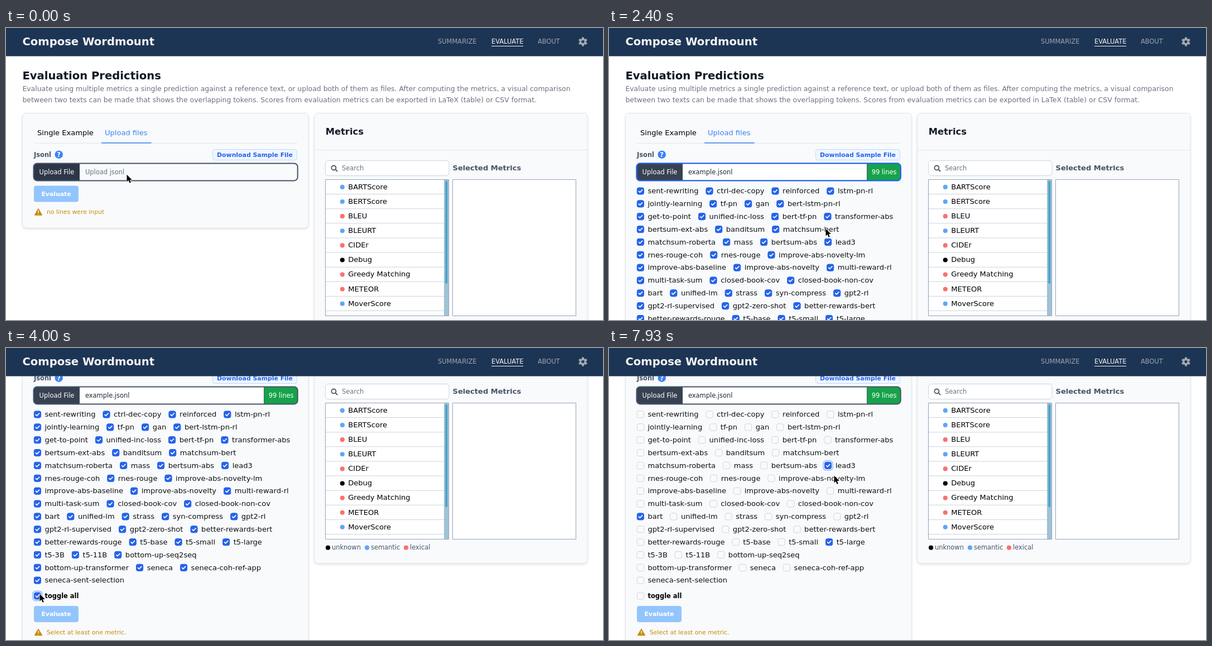
Write an HTML page with a canvas that moves like this. It is 1070 px wide and 523 px high and loops after 8 s.

```html
<!DOCTYPE html>
<html lang="en">
<head>
<meta charset="utf-8">
<title>Evaluation Predictions</title>
<style>
  html, body { margin: 0; width: 100%; height: 100%; overflow: hidden; background: #fff; }
  canvas { display: block; }
</style>
</head>
<body>
<canvas id="stage" width="1070" height="523"></canvas>
<script>
const ctx = document.getElementById('stage').getContext('2d');
const LOOP = 8000, TICKS_PER_MS = 0.015;
const BODY = 13.06, INTRO = 12.43, SMALL = 11.43, BUTTON = 10.88, LARGE = 19.6;
const BLUE = '#2563eb', SKY = '#60a5fa', RED = '#f87171', AMBER = '#ca8a04';
const SLATE = '#475569', GRAY = '#6b7280', LINE = '#e2e8f0';

const models = `sent-rewriting ctrl-dec-copy reinforced lstm-pn-rl
jointly-learning tf-pn gan bert-lstm-pn-rl
get-to-point unified-inc-loss bert-tf-pn transformer-abs
bertsum-ext-abs banditsum matchsum-bert
matchsum-roberta mass bertsum-abs lead3
rnes-rouge-coh rnes-rouge improve-abs-novelty-lm
improve-abs-baseline improve-abs-novelty multi-reward-rl
multi-task-sum closed-book-cov closed-book-non-cov
bart unified-lm strass syn-compress gpt2-rl
gpt2-rl-supervised gpt2-zero-shot better-rewards-bert
better-rewards-rouge t5-base t5-small t5-large
t5-3B t5-11B bottom-up-seq2seq
bottom-up-transformer seneca seneca-coh-ref-app
seneca-sent-selection`.split('\n').map(row => row.split(' '));

const metrics = [['BARTScore', SKY], ['BERTScore', SKY], ['BLEU', RED], ['BLEURT', SKY], ['CIDEr', RED],
  ['Debug', '#000'], ['Greedy Matching', RED], ['METEOR', RED], ['MoverScore', SKY], ['ROUGE', RED]];

// Pointer moves: first tick, last tick, x, y
const moves = [[2, 2, 215.5, 261.5], [5, 8, 211, 258], [12, 22, 388, 359], [41, 41, 389, 361],
  [43, 49, 262, 334], [52, 53, 57, 472], [55, 56, 60, 440], [64, 65, 84, 426], [67, 68, 254, 399],
  [70, 72, 280, 357], [76, 81, 397, 343], [91, 91, 46, 313], [92, 93, 39, 308], [94, 97, 56, 302],
  [102, 108, 406, 214], [119, 119, 403, 228]];

// Scroll position from a given tick on
const scrolls = [[0, 0], [43, 18], [44, 95], [46, 120], [49, 161.5], [52, 168], [53, 173]];

function text(str, x, y, size, color, bold, align = 'left') {
  ctx.font = `${bold ? 'bold ' : ''}${size}px "DejaVu Sans", sans-serif`;
  ctx.fillStyle = color;
  ctx.textAlign = align;
  ctx.fillText(str, x, y + size * 0.325);
}

function box(x, y, w, h, r, fill, stroke, width = 1) {
  ctx.beginPath();
  ctx.roundRect(x, y, w, h, r);
  if (fill) { ctx.fillStyle = fill; ctx.fill(); }
  if (stroke) { ctx.strokeStyle = stroke; ctx.lineWidth = width; ctx.stroke(); }
}

function dot(x, y, r, color) {
  ctx.beginPath();
  ctx.arc(x, y, r, 0, 7);
  ctx.fillStyle = color;
  ctx.fill();
}

function path(d, x, y, stroke, width, fill) {
  const shape = new Path2D(d);
  ctx.save();
  ctx.translate(x, y);
  if (fill) { ctx.fillStyle = fill; ctx.fill(shape); }
  if (stroke) {
    ctx.strokeStyle = stroke;
    ctx.lineWidth = width;
    ctx.lineCap = ctx.lineJoin = 'round';
    ctx.stroke(shape);
  }
  ctx.restore();
}

function card(x, y, w, h) {
  ctx.save();
  ctx.shadowColor = 'rgba(0,0,0,.13)';
  ctx.shadowBlur = 5;
  ctx.shadowOffsetY = 2;
  box(x, y, w, h, 6.5, '#f8fafc');
  ctx.restore();
  box(x, y, w, h, 6.5, null, LINE);
}

function checkbox(x, y, checked, focused) {
  if (focused) box(x - 2, y - 8.5, 17, 17, 5, '#fff', '#7fb0fb', 1.3);
  box(x + .4, y - 6.1, 12.2, 12.2, 3, checked ? BLUE : '#f9fafb', checked ? BLUE : '#d1d5db');
  if (checked) path('M-3 .3L-1 2.3L3.2-2', x + 6.5, y, '#fff', 1.7);
}

function mixBlue(p) {
  const mix = (a, b) => Math.round(a + (b - a) * p);
  return `rgb(${mix(147, 37)},${mix(197, 99)},${mix(253, 235)})`;
}

function drawField(loaded, focused) {
  text('Jsonl', 50, 227, SMALL, SLATE, true);
  dot(94.7, 226.7, 7.2, '#3b82f6');
  text('?', 94.7, 226.9, 11.5, '#fff', true, 'center');
  box(370.5, 217.5, 151, 19, 4, '#eff6ff', '#bfdbfe');
  text('Download Sample File', 446, 227, BUTTON, BLUE, true, 'center');

  ctx.save();
  ctx.beginPath();
  ctx.roundRect(49.5, 242.4, 473.2, 31, 6);
  ctx.clip();
  box(49, 242, 474, 32, 0, loaded ? '#fff' : '#f8fafc');
  box(49, 242, 83, 32, 0, loaded ? '#374151' : '#2d3748');
  if (loaded) box(463, 242, 60, 32, 0, '#16a34a');
  ctx.restore();
  if (loaded) {
    box(462, 243, 1, 30, 0, SLATE);
    text('99 lines', 493, 258, SMALL, '#fff', false, 'center');
  }
  box(49.5, 242.4, 473.2, 31, 6.3, null, focused ? BLUE : SLATE, focused ? 2.4 : 2);
  text('Upload File', 91, 258, SMALL, '#fff', false, 'center');
  text(loaded ? 'example.jsonl' : 'Upload jsonl', 142, 258, SMALL, loaded ? '#1f2937' : GRAY);
}

function drawModels(tick) {
  const all = tick < 62;
  const checkedFrom = { 't5-large': 88, bart: 104, lead3: 116 };
  const focusTicks = { 't5-large': [85, 102], bart: [102, 113], lead3: [116, 999] };
  models.forEach((row, i) => {
    let x = 49.9;
    const y = 292 + i * 22.86;
    for (const name of row) {
      const [from, to] = focusTicks[name] || [0, 0];
      checkbox(x, y, all || tick >= checkedFrom[name], tick >= from && tick < to);
      text(name, x + 19.6, y, BODY, '#111');
      x += 32.65 + ctx.measureText(name).width;
    }
  });
  checkbox(49.9, 617, all, tick >= 58 && tick < 85);
  text('toggle all', 69.5, 617, SMALL, '#000', true);
}

function drawLeft(tick) {
  const loaded = tick >= 36;
  const ready = tick >= 62 && tick < 88;
  const buttonY = loaded ? 649.5 : 297;
  card(29.5, 152.5, 512.5, buttonY + (ready ? 34.5 : 61) - 152.5);

  text('Single Example', 56, 188, BODY, '#000');
  text('Upload files', 177, 188, BODY, '#3b82f6');
  box(50, 206, 472, 1, 0, LINE);
  box(171, 205, 89.5, 1.6, 0, '#3b82f6');
  drawField(loaded, (tick >= 5 && tick < 10) || (loaded && tick < 58));
  if (loaded) drawModels(tick);

  box(50, buttonY - 14.5, 80, 29, 4, mixBlue(ready ? Math.min(1, (tick - 61) / 4) : 0));
  text('Evaluate', 90, buttonY, BUTTON, '#fff', true, 'center');
  if (!ready) {
    const y = buttonY + 32.7;
    path('M0-5.6L6.2 5.2H-6.2Z', 58, y, AMBER, 1.6, AMBER);
    path('M0-2.4V1.2M0 3.4V3.5', 58, y, '#f8fafc', 1.4);
    text(loaded ? 'Select at least one metric.' : 'no lines were input', 73, y, 10.82, AMBER);
  }
}

function drawRight() {
  card(552.5, 152.5, 489.5, 406);
  text('Metrics', 572.7, 185.5, 16.33, '#111827', true);
  box(553, 218, 489, 1, 0, LINE);
  box(572.5, 237.5, 221.5, 27, 5, '#fff', '#cbd5e1');
  path('M3.4 0A4 4 0 1 1-4.6 0A4 4 0 1 1 3.4 0M2.6 3L5.6 6', 588, 250.5, SLATE, 1.8);
  text('Search', 602, 251.3, SMALL, GRAY);
  text('Selected Metrics', 800.5, 251, BODY, SLATE, true);

  ctx.save();
  box(572.5, 271.5, 221, 244, 0, '#fff');
  ctx.clip();
  metrics.forEach(([name, color], i) => {
    const y = 284.5 + i * 26.12;
    dot(602.8, y + .4, 4.1, color);
    text(name, 613.2, y, BODY, '#000');
    box(573, y + 12.6, 212, 1, 0, '#cbd5e1');
  });
  box(785, 271.5, 9, 244, 0, '#9fc3d5');
  box(787.5, 274, 3.6, 184, 1.8, '#48a0c8');
  ctx.restore();
  box(572.5, 271.5, 221, 244, 0, null, '#94a3b8');
  box(800.5, 271.5, 221, 244, 0, '#fff', '#94a3b8');

  [['unknown', 577, '#000'], ['semantic', 647, SKY], ['lexical', 717, RED]].forEach(([name, x, color]) => {
    dot(x, 530.7, 4.1, color);
    text(name, x + 7, 530.5, SMALL, SLATE);
  });
}

function drawPage(tick) {
  const scroll = scrolls.filter(([from]) => tick >= from).pop()[1];
  ctx.save();
  ctx.translate(0, -scroll);
  text('Evaluation Predictions', 29.4, 86, LARGE, '#111827', true);
  text('Evaluate using multiple metrics a single prediction against a reference text, or upload both of them as files. After computing the metrics, a visual comparison', 29.4, 109, INTRO, GRAY);
  text('between two texts can be made that shows the overlapping tokens. Scores from evaluation metrics can be exported in LaTeX (table) or CSV format.', 29.4, 128.5, INTRO, GRAY);
  drawLeft(tick);
  drawRight();
  ctx.restore();
}

function drawHeader() {
  box(0, 0, 1070, 50.6, 0, '#1d3554');
  text('Compose Wordmount', 29.4, 24.5, LARGE, '#f3f4f6', true);
  text('SUMMARIZE', 774, 24.7, SMALL, '#9ca3af');
  text('EVALUATE', 870, 24.7, SMALL, '#f3f4f6');
  box(870, 32, 57, 1, 0, '#f3f4f6');
  text('ABOUT', 953, 24.7, SMALL, '#9ca3af');
  ctx.save();
  ctx.translate(1034, 24.5);
  ctx.strokeStyle = '#a3a8b0';
  ctx.lineWidth = 3.4;
  ctx.beginPath();
  ctx.arc(0, 0, 4.3, 0, 7);
  ctx.stroke();
  for (let i = 0; i < 6; i++) {
    ctx.rotate(Math.PI / 3);
    box(-2, -8, 4, 3, .8, '#a3a8b0');
  }
  ctx.restore();
}

function drawDialog() {
  const light = '#d3dae3', dim = '#b5bcc8', dark = '#353945', size = 11.87;
  box(213.5, -5, 653, 469, 0, dark);
  box(371, 28, 495, 403, 0, '#404552');
  box(370, 0, 1, 431, 0, '#2b2e39');
  box(474, -4, 79, 6.5, 0, '#5294e2');
  box(553.5, -4, 22, 6.5, 2, '#444a58', '#2b2e39');
  path('M-5.5 0L0-5.5L5.5 0M-4-1V5.5H-1.3V1.5H1.3V5.5H4V-1', 229, 17, dim, 1.1);
  path('M-5.5 4.5V-4.5H-1.5L0-2.5H5.5V4.5Z', 229, 43.5, dim, 1.1);
  path('M-5.5 0H5.5M0-5.5V5.5', 229, 76.5, dim, 1.2);
  text('Persönlicher Ordner', 241.5, 17, size, light);
  text('Schreibtisch', 241.5, 43.3, size, light);
  text('Andere Orte', 241.5, 76.5, size, light);

  for (const x of [652, 708, 745]) box(x, 10, 1, 17, 0, '#2b2e39');
  [['Name', 376], ['Größe', 658], ['Typ', 713], ['Letzte Änderung', 750.5]]
    .forEach(([label, x]) => text(label, x, 18.5, 11.75, dim, true));
  path('M-4.5-2.2H4.5L0 2.6Z', 641, 18.8, null, 0, light);
  box(371, 28.3, 495, 19.6, 0, '#5294e2');
  path('M-4.6-6H1.6L4.8-2.8V6H-4.6Z', 384, 38.3, null, 0, '#f3f4f6');
  path('M-2.5-1.5H2.5M-2.5 1H2.5M-2.5 3.5H2.5', 384, 38.3, '#a8adb5', .8);
  text('example.jsonl', 396.7, 38.3, size, '#fff');
  text('1.8 MB', 701.5, 38.3, size, '#fff', false, 'right');
  text('Text', 714.5, 38.3, size, '#fff');
  text('15:44', 752, 38.3, size, '#fff');

  box(674.5, 435.5, 91, 23, 2, '#444a58', '#2b2e39');
  box(769.5, 435.5, 91, 23, 2, '#444a58', '#2b2e39');
  text('Abbrechen', 720, 447, size, light, false, 'center');
  text('Öffnen', 815, 447, size, light, false, 'center');
  box(213.5, -5, 653, 469, 0, null, '#3f38b0');
}

function drawPointer(tick) {
  let x = 216, y = 262;
  for (const [first, last, toX, toY] of moves) {
    if (tick < first) break;
    const p = Math.min(1, (tick - first + 1) / (last - first + 1));
    x += (toX - x) * p;
    y += (toY - y) * p;
  }
  const arrow = 'M.5.5V13.5L3.5 10.8L5.6 15.8L7.8 14.8L5.7 10H9.8Z';
  path(arrow, x, y, '#fff', 1.4);
  path(arrow, x, y, null, 0, '#000');
}

function render(now) {
  const tick = Math.floor((now % LOOP) * TICKS_PER_MS + 0.06);
  ctx.fillStyle = '#fff';
  ctx.fillRect(0, 0, 1070, 523);
  drawPage(tick);
  drawHeader();
  if (tick >= 10 && tick < 36) drawDialog();
  drawPointer(tick);
}

const start = performance.now();
function loop() {
  render(performance.now() - start);
  requestAnimationFrame(loop);
}
loop();
</script>
</body>
</html>
```
